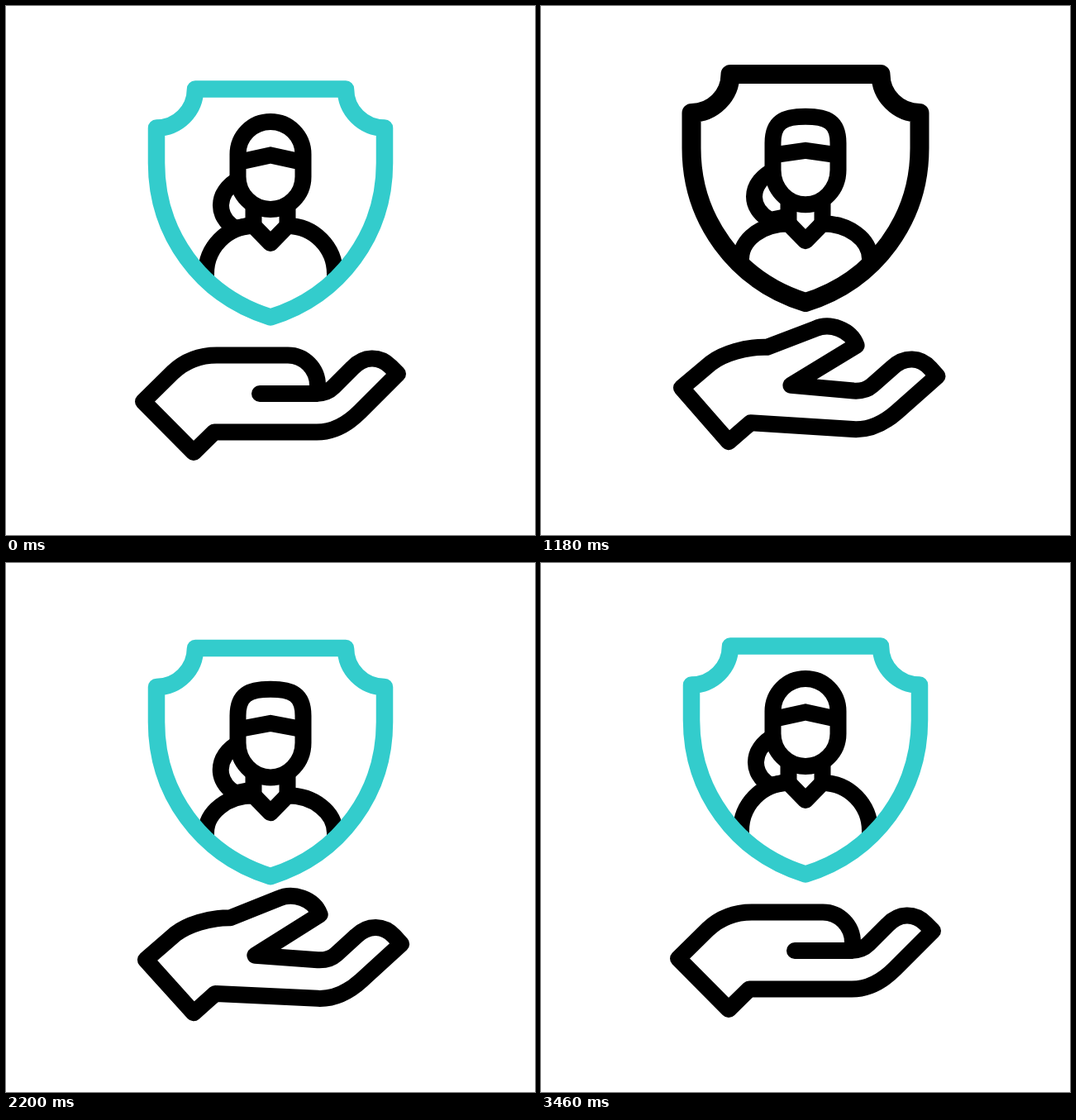
An HTML page for the animation above (3600 ms loop, 640x640 px).

```html
<!DOCTYPE html>
<html lang="en">
<head>
<meta charset="utf-8">
<style>
  html, body { margin: 0; height: 100%; overflow: hidden; background: #fff; }
  svg { display: block; width: 100vw; height: 100vh; }
  path { fill: none; stroke: #000; stroke-width: 20; stroke-linejoin: round; }
  #hand { stroke-linecap: round; }
  #rays { stroke: #3cc; stroke-linecap: round; }
  #band { stroke-linejoin: miter; }
</style>
</head>
<body>
<svg viewBox="0 0 640 640">
  <clipPath id="inside"><path id="inner"/></clipPath>
  <g clip-path="url(#inside)">
    <path id="hair"/>
    <path id="body"/>
    <path id="neck"/>
    <path id="head"/>
    <path id="band"/>
  </g>
  <path id="shield"/>
  <path id="rays"/>
  <path id="hand"/>
</svg>
<script>
const LOOP = 3600, END = 3460;
const KEYS = [0, 600, 1200, 1800, 2400, 2920];
const BLACK = [[1040, 1280], [2660, 2960]];
const SHIELD = 'M229 100.5H411A47 47 0 0 0 458 147.5V190C458 275 405 350 320 376.5' +
  'C235 350 182 275 182 190V147.5A47 47 0 0 0 229 100.5Z';

const $ = id => document.getElementById(id);
const draw = (id, d) => $(id).setAttribute('d', d);
const move = (id, transform) => $(id).setAttribute('transform', transform);
const mix = (a, b, k) => a + (b - a) * k;
const ease = (t, from, to) => {
  const u = Math.min(1, Math.max(0, (t - from) / (to - from)));
  return u * u * (3 - 2 * u);
};

// Rest, then down / up / down / up / down, then rest again.
function sway(t, lag, down, up) {
  const times = KEYS.map((k, i) => i ? k + lag : Math.max(0, lag)).concat(END);
  const values = [0, down, up, down, up, down, 0];
  let i = 0;
  while (i < 5 && t >= times[i + 1]) i++;
  return mix(values[i], values[i + 1], ease(t, times[i], times[i + 1]));
}

// 0 at rest, 1 while bouncing.
const active = (t, lag) => ease(t, lag, 600 + lag) - ease(t, 2920 + lag, END);

function drawHand(t) {
  const k = active(t, 0);
  const p = (x0, y0, x1, y1) => `${mix(x0, x1, k)} ${mix(y0, y1, k)} `;
  draw('hand', 'M166 478.5L' + p(202, 443, 200, 446) +
    'C' + p(217, 429, 214, 434) + p(235, 422.5, 240, 424) + p(255, 422.5, 266, 423) +
    'L' + p(341, 422.5, 323, 397) +
    'C' + p(361, 422.5, 340, 388) + p(377, 439, 366, 395) + p(377, 459, 374, 414) +
    'L' + p(377, 469, 374, 414) + 'L' + p(307, 469, 298, 467) + 'L' + p(375, 469, 374, 469) +
    'C386 469 392 465 396 461L419 438C433 423 452 423 465 436L474 445' +
    'L428 491C412 507 396 515.5 376 515.5H252L227 540Z');
  move('hand', `translate(0 ${sway(t, 0, 54.5, -13)}) rotate(${sway(t, 0, 0, 3.6)} 227 540)`);
}

function drawPerson(t, drop) {
  const top = 140 + sway(t, 140, 31, -14);
  const shift = sway(t, 180, 27, -17);
  const temple = 189 + sway(t, 180, 27, -21);
  const chin = 246 + shift;
  const collar = 266 + sway(t, 180, 28, -13.5);
  const k = active(t, 80);
  const crown = mix(39.5, 32, k), jaw = mix(39.5, 42, k);
  const bend = mix(22, 26, k), cheek = top + crown;
  const foot = 324 + drop, ry = foot - collar;

  draw('head', `M280.5 ${cheek}C280.5 ${cheek - bend} ${320 - bend} ${top} 320 ${top}` +
    `S359.5 ${cheek - bend} 359.5 ${cheek}` +
    `V${chin - jaw}A39.5 ${jaw} 0 0 1 280.5 ${chin - jaw}Z`);
  draw('band', `M281 ${temple}L320 ${180.5 + shift}L359 ${temple}`);
  draw('neck', `M299.5 ${chin - 4}V${collar + 2}M340.5 ${chin - 4}V${collar + 2}`);
  draw('body', `M242 ${foot + 8}V${foot}A57.5 ${ry} 0 0 1 299.5 ${collar}` +
    `L320 ${collar + 21}L340.5 ${collar}A57.5 ${ry} 0 0 1 398 ${foot}V${foot + 8}`);

  const root = 211 + sway(t, 100, 33, -16);
  const end = 269 + sway(t, 140, 28, -18);
  const swing = 254 + sway(t, -40, 8, -2) * 4 / 3;
  draw('hair', `M279 ${root}C${swing} ${root + 17} ${swing} ${end - 15} 277 ${end}L297 ${end - 4}`);
}

function drawRays(t, drop) {
  const phase = t % 1065;
  const tip = ease(phase, 450, 650), tail = ease(phase, 630, 1067);
  let d = '';
  if (t < 3195 && tip - tail > 0.005) {
    const ray = (x0, y0, x1, y1) => {
      const at = k => `${mix(x0, x1, k)} ${mix(y0, y1, k)}`;
      d += `M${at(tail)}L${at(tip)}`;
    };
    for (const side of [-1, 1]) {
      const x = distance => 316.5 + side * distance;
      ray(x(184.5), 188, x(248.5), 188);
      ray(x(169.5), 161, x(200.5), 130);
      ray(x(169.5), 215.5, x(200.5), 246.5);
    }
  }
  draw('rays', d);
  move('rays', `translate(0 ${drop})`);
}

function render(t) {
  const drop = sway(t, 80, 33, -22);
  const black = BLACK.some(([from, to]) => t >= from && t < to);
  for (const id of ['shield', 'inner']) move(id, `translate(0 ${drop})`);
  $('shield').style.stroke = black ? '#000' : '#3cc';
  $('shield').style.strokeWidth = black ? 23 : 20.5;
  drawPerson(t, drop);
  drawRays(t, drop);
  drawHand(t);
}

draw('shield', SHIELD);
draw('inner', SHIELD);
const start = performance.now();
(function tick() {
  render((performance.now() - start) % LOOP);
  requestAnimationFrame(tick);
})();
</script>
</body>
</html>
```
